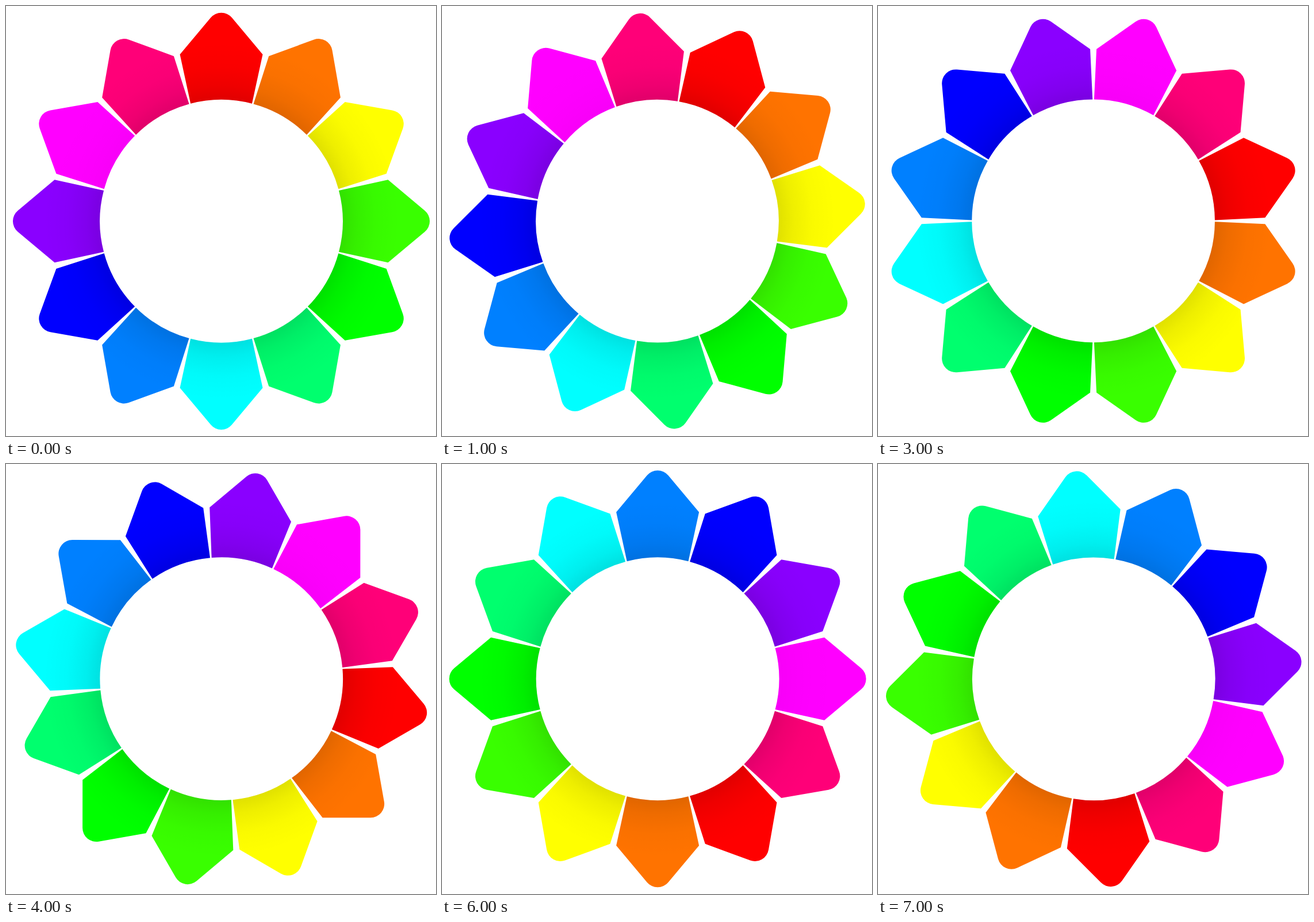
Write an HTML page that moves like this. It is 748 by 748 pixels and loops after 8 s.

```html
<!DOCTYPE html>
<html lang="en">
<head>
<meta charset="utf-8">
<title>Turning colour wheel</title>
<style>
  html, body { margin: 0; width: 100%; height: 100%; overflow: hidden; background: #fff; }
  svg { display: block; width: 100vw; height: 100vh; }
</style>
</head>
<body>
<svg viewBox="0 0 748 748">
  <defs>
    <radialGradient id="shade" gradientUnits="userSpaceOnUse" cx="0" cy="0" r="310">
      <stop offset=".68" stop-opacity=".12"/>
      <stop offset=".76" stop-opacity=".065"/>
      <stop offset=".87" stop-opacity=".02"/>
      <stop offset="1" stop-opacity="0"/>
    </radialGradient>
    <path id="petal" d="M-53.4 -204.5L-72 -290L-18.4 -354A24 24 0 0 1 18.4 -354L72 -290L53.4 -204.5A211.3 211.3 0 0 0 -53.4 -204.5Z"/>
  </defs>
  <g id="wheel"></g>
</svg>
<script>
const COLORS = ['#ff0000', '#ff7300', '#ffff00', '#39ff00', '#00ff00', '#00ff6e',
                '#00ffff', '#0080ff', '#0000ff', '#8a00ff', '#ff00ff', '#ff0078'];
const LOOP = 8000, STEP = 1000, TURN = 25;
const wheel = document.getElementById('wheel');

wheel.innerHTML = COLORS.map((color, i) => {
  const depth = color === '#ff00ff' ? 0.25 : 1;
  return `<g transform="rotate(${i * 30})">
    <use href="#petal" fill="${color}"/>
    <use href="#petal" fill="url(#shade)" opacity="${depth}"/>
  </g>`;
}).join('');

// The wheel sits slightly off its axis, so its centre drifts as it turns.
function draw(ms) {
  const angle = Math.floor((ms % LOOP) / STEP) * TURN;
  wheel.setAttribute('transform', `translate(374.9 374.1) rotate(${angle}) translate(-.37 .22)`);
}

const start = performance.now();
function tick() {
  draw(performance.now() - start);
  requestAnimationFrame(tick);
}
tick();
</script>
</body>
</html>
```
